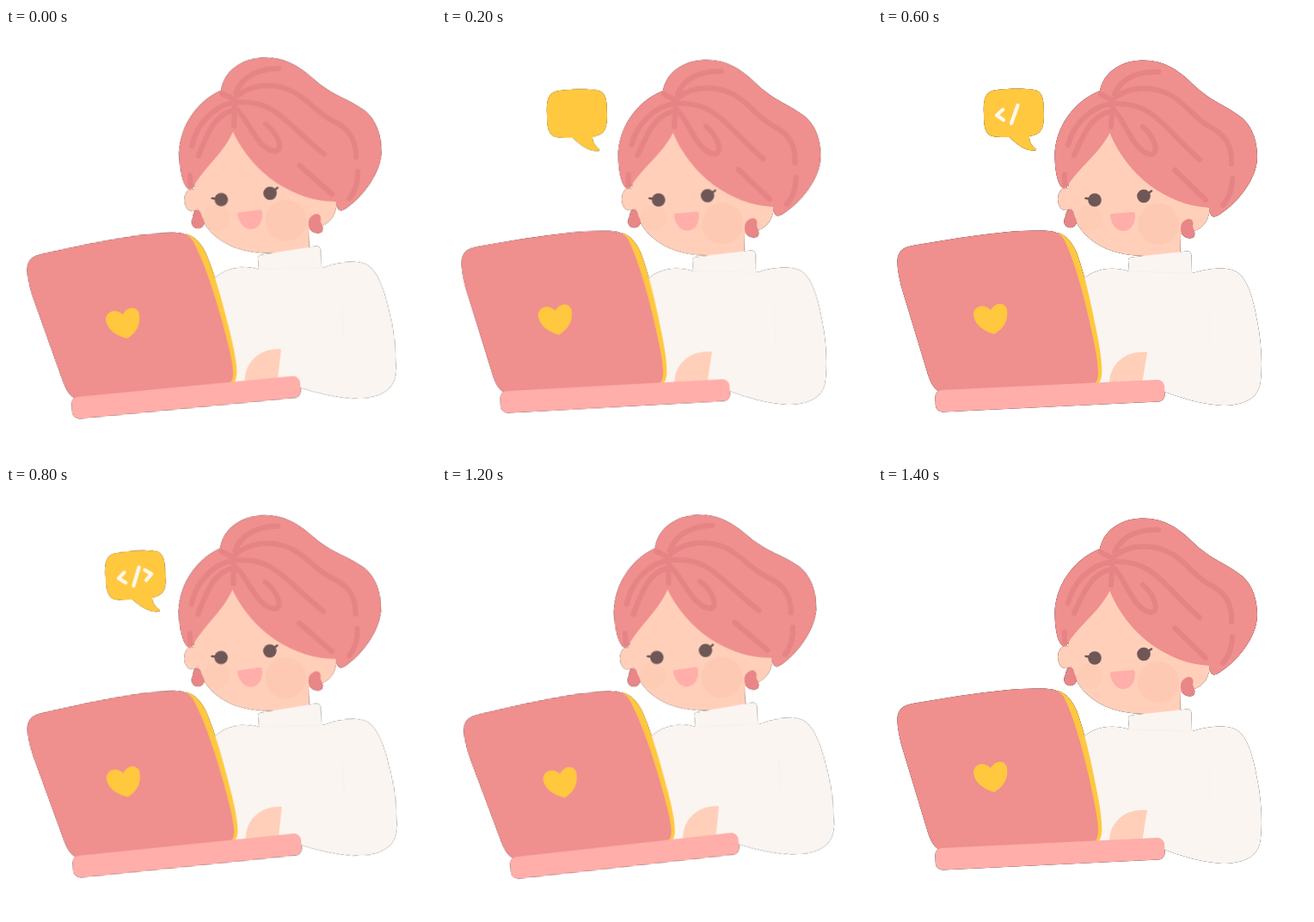
Recreate the animation shown at these times as an HTML page. Size 500x500 px, loop 1.6 s.

```html
<!DOCTYPE html>
<html lang="en">
<head>
<meta charset="utf-8">
<title>Coding at a laptop</title>
<style>
html, body { margin: 0; width: 100%; height: 100%; overflow: hidden; background: #fff; }
svg { display: block; width: 100%; height: 100%; }
#scene { filter: drop-shadow(0 0 .5px #000); }
.hair { fill: #ef8f8e; }
.pink { fill: #ffaeaa; }
.gold { fill: #ffc83f; }
.skin { fill: #ffcfb9; }
.blush { fill: #fec9b2; }
.knit { fill: #faf5f1; }
.dark { fill: #6f5757; }
.gem { fill: #e98687; }
.line { fill: none; stroke-linecap: round; stroke-linejoin: round; }
</style>
</head>
<body>
<svg viewBox="0 0 500 500">
<g id="scene">
  <!-- face -->
  <g class="skin">
    <ellipse cx="218" cy="199" rx="9" ry="13"/>
    <path d="M352 210 L386 207 C386 222 379 232 368 236 L352 240Z"/>
    <path d="M270 115 C245 145 222 168 221 186 C221 226 245 264 310 265 L310 285 L351 285 L352 240 L372 212 L385 205Z"/>
  </g>
  <g class="blush">
    <circle cx="326" cy="228" r="24"/>
    <circle cx="246" cy="221" r="15" opacity=".5"/>
  </g>
  <g class="dark">
    <circle cx="252" cy="200" r="7.8"/>
    <circle cx="309" cy="195.500" r="7.8"/>
  </g>
  <path class="line" stroke="#6f5757" stroke-width="2.5" d="M241.500 198 L248 199 M313 193 L318 189.500"/>
  <path class="pink" d="M272 216 L296 214 Q299 214 299 218 C299 229 293 236 285 236 C277 236 271 228 270 218 Q270 216 272 216Z"/>

  <!-- sweater -->
  <path class="knit" d="M291 270 Q291 267 295 266.500 L359 259.500 Q364 259 364.500 264 L365 285 C385 279 405 277 416 283 C430 290 437 317 441 341 C446 365 447 390 445 410 C443 432 424 439 400 439 C374 437 352 430 333 423 L245 420 L236 295 C248 281 270 276 292 283Z"/>
  <path class="line" stroke="#f7f0ec" stroke-width="1" d="M293 283 L364 285 M386 326 L386 365"/>

  <!-- earrings -->
  <g class="gem">
    <path d="M223 211 C229 211 227 217 230 221 C233 228 228 233 222 232 C216 231 215 224 218 219 C219 214 220 211 223 211Z"/>
    <path d="M358 223 C364 220 368 224 366 231 C368 236 370 241 366 244 C358 246 351 241 352 232 C352 228 354 225 358 223Z"/>
  </g>

  <!-- hair -->
  <path class="hair" d="M216 187 C209 183 206 168 205.500 150 C205 117 227 85 258 73 C262 52 282 37.500 308 37.500 C333 37.500 350 49 368 67 C388 86 407 91 424 105 C437 117 441 134 441 150 C441 177 416 205 397 217 C389 222 386 219 385 209 C336 206 290 172 269.500 122 C256 148 231 164 219 186Z"/>
  <path class="line" stroke="#e68384" stroke-width="6" d="M275 77 C283 58 303 50 326 51
    M259 77 L274 85
    M276 81 C293 67 321 67 342 79 C361 91 368 105 386 115 C404 124 412 137 411 158
    M277 88 C320 87 331 115 374 153
    M273 94 C287 105 296 145 318 147 C328 145 321 126 308 115
    M271 88 C246 92 227 113 221 136
    M271 97 C248 101 239 124 228 148
    M273 86 L271 115
    M345 165 L381 200
    M412 175 C412 188 408 198 401 206
    M217 170 L217 182"/>

  <!-- hand and laptop -->
  <path class="skin" d="M269 415 C268 393 286 374 313 377 L307 414Z"/>
  <path class="gold" d="M208 238 C219 240 226 250 231 261 C241 288 248 322 255 357 C259 378 261 394 260 404 Q259 414 252 415 L235 400Z"/>
  <path class="hair" d="M40 253 C88 245 140 236 182 235.500 C204 235 210 237 216 245 C227 267 237 302 245 337 C251 365 256 386 256 402 Q256 413 248 415 L75 425 C66 421 62 415 58 403 L28 304 C25 293 22 279 22.500 270 C23 260 29 255 40 253Z"/>
  <path class="gold" d="M131 328 C136 319 147 318 150 327 C152 340 146 350 135 356 C121 352 112 344 111 333 C112 322 124 320 131 328Z"/>
  <rect class="pink" x="66.500" y="415" width="267" height="25.500" rx="8" transform="rotate(-2.700 200 428)"/>

  <!-- speech bubble -->
  <g id="bubble">
    <path class="gold" d="M123 100 C122 80 126 73 138 72 C154 70 171 70 182 72 C192 74 193 84 193 100 C193 117 190 124 176 126 C176 133 179 137 184 141 C185 144 177 143 170 140 C162 136 157 131 153 127 C139 127 130 127 127 122 C123 116 123 108 123 100Z"/>
    <g class="line" stroke="#fff8ee" stroke-width="4.200">
      <path class="glyph" d="M145 95 L138 101.500 L146 107"/>
      <path class="glyph" d="M162.500 90 L155 111"/>
      <path class="glyph" d="M169 93.500 L176.500 98.500 L170 105.500"/>
    </g>
  </g>
</g>
</svg>
<script>
const STEP = 200;
const tilts = [-2.8, -.4, -.1, 0, -3.15, -1, -3.65, 0];
const scene = document.getElementById('scene');
const bubble = document.getElementById('bubble');
const glyphs = document.querySelectorAll('.glyph');
const show = (el, on) => el.setAttribute('display', on ? 'inline' : 'none');

function draw(now) {
  const i = Math.floor(now / STEP) % tilts.length;
  scene.setAttribute('transform', `rotate(${tilts[i]} 241 234)`);
  show(bubble, i >= 1 && i <= 5);
  glyphs.forEach((g, n) => show(g, i >= n + 2));
  requestAnimationFrame(draw);
}
draw(performance.now());
</script>
</body>
</html>
```
